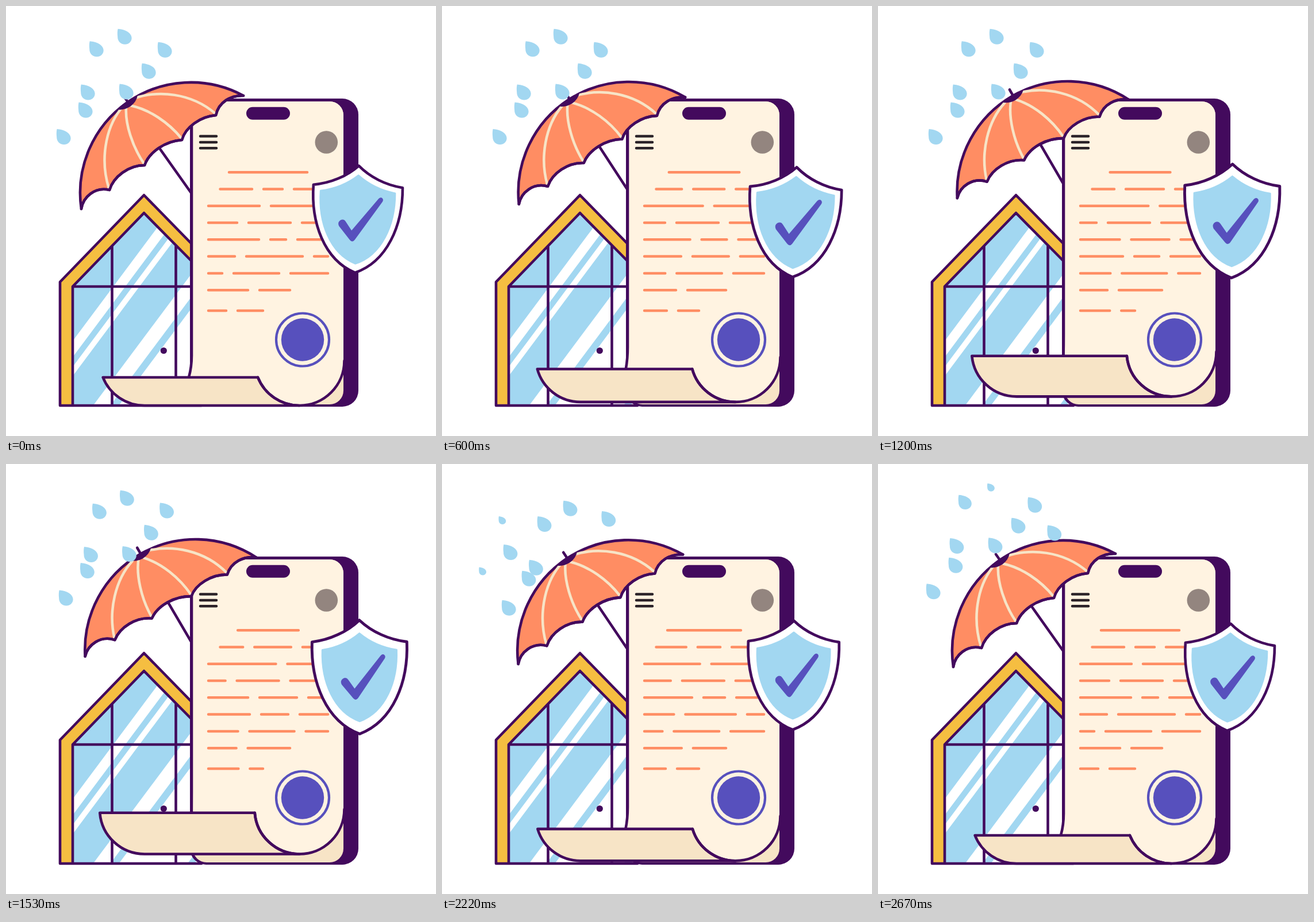
An HTML page that plays this animation: 748 px wide and 748 px high, repeating every 2700 ms.

```html
<!DOCTYPE html>
<html lang="en">
<head>
<meta charset="utf-8">
<title>Home insurance</title>
<style>
  html, body { margin: 0; width: 100%; height: 100%; overflow: hidden; background: #fff; }
  svg { display: block; width: 100vw; height: 100vh; }
  .line { fill: none; stroke: #430a5d; stroke-width: 4.6; stroke-linecap: round; stroke-linejoin: round; }
  .dark { fill: #430a5d; }
  .cream { fill: #fff3e1; }
  .beige { fill: #f7e4c6; }
  .blue { fill: #a2d7f1; }
  .violet { fill: #5750bd; }
</style>
</head>
<body>
<svg viewBox="0 0 748 748" xmlns="http://www.w3.org/2000/svg">
  <defs>
    <clipPath id="pane"><path d="M116 695V488L240 360L330 451V695Z"/></clipPath>
  </defs>

  <g id="house">
    <path fill="#f5be41" d="M94 695V480L240 329L330 421V695Z"/>
    <path class="blue" d="M116 695V488L240 360L330 451V695Z"/>
    <g id="shine" fill="#fff" clip-path="url(#pane)"></g>
    <path class="line" d="M94 695V480L240 329L330 421M116 695V488L240 360L330 451M94 695H340M116 488H330M184.500 418V695M295.500 417V695"/>
    <circle class="dark" cx="274.300" cy="599.500" r="5.600"/>
  </g>

  <path id="stick" class="line" d="M266 246L350 364.500"/>

  <g id="phone">
    <rect class="dark" x="320" y="161" width="293" height="536" rx="28"/>
    <rect class="beige" x="325" y="166" width="262" height="527" rx="24"/>
  </g>

  <path id="paper" class="cream"/>
  <rect class="dark" x="418" y="175.700" width="76" height="22" rx="11"/>
  <path d="M338 226.500H366M338 237H366M338 247.200H366" stroke="#2a2228" stroke-width="4.500" stroke-linecap="round"/>
  <circle cx="557.300" cy="237" r="19.800" fill="#93857f"/>
  <path id="text" fill="none" stroke="#ff8d63" stroke-width="4.500" stroke-linecap="round"/>
  <circle class="violet" cx="516" cy="580.500" r="37.200"/>
  <circle cx="516" cy="580.500" r="46" fill="none" stroke="#5750bd" stroke-width="4.200"/>
  <path id="edge" class="line"/>
  <path id="curl" class="line" style="fill:#f7e4c6"/>
  <path id="lobe" class="line"/>

  <g id="canopy">
    <path class="line" d="M212 167L205 157"/>
    <path class="line" style="fill:#ff8d63" d="M131 353A192.500 192.500 0 0 1 413 156C391 155 370 167 365 190C338 192 312 211 306 233C277 235 249 254 241 277C213 277 187 297 180 320C155 314 134 332 131 353Z"/>
    <path fill="none" stroke="#f7e4c6" stroke-width="4.500" stroke-linecap="round" d="M199 180C172 215 164 270 179 317M209 176C207 205 220 245 240 274M216 173C250 180 283 203 305 230M222 161C265 146 322 151 364 187"/>
    <path class="line" d="M131 353C134 332 155 314 180 320C187 297 213 277 241 277C249 254 277 235 306 233C312 211 338 192 365 190C370 167 391 155 413 156"/>
    <path class="dark" d="M193 180Q209 164 229 155Q227 167 216.500 174.500Q205 182 193 180Z"/>
  </g>

  <g id="rain" class="blue"></g>

  <g id="shield">
    <path id="rim" class="line" style="fill:#fff" d="M0 -93C-20 -74 -48 -61 -77.500 -57.500C-80 8 -55 72 0 93C55 72 80 8 77.500 -57.500C48 -61 20 -74 0 -93Z"/>
    <path id="plate" class="blue" stroke="#a2d7f1" stroke-width="3" stroke-linejoin="round" d="M0 -76.500C-18 -61.500 -40 -51.500 -65 -47.500C-67 8 -45 61 0 77.500C45 61 67 8 65 -47.500C40 -51.500 18 -61.500 0 -76.500Z"/>
    <path id="tick" class="violet" d="M-30.800 13Q-34 6 -28.500 2.500Q-23 -.5 -19.500 4.500L-8.600 20L36.500 -37Q40 -40.500 43 -38Q45.500 -35.500 43.500 -32L-2.500 36Q-6.500 41.500 -11 36.500Z"/>
  </g>
</svg>

<script>
const LOOP = 2700, SWING = 2670, SHOWER = 300;
const $ = id => document.getElementById(id);
const set = (id, name, value) => $(id).setAttribute(name, value);

function add(parent, d) {
  const path = document.createElementNS('http://www.w3.org/2000/svg', 'path');
  path.setAttribute('d', d);
  return $(parent).appendChild(path);
}

// Eased hill: 0 to 1 by `rise`, back to 0 between `fall` and `end`.
const ease = u => (1 - Math.cos(Math.PI * Math.max(0, Math.min(1, u)))) / 2;
const hill = (rise, fall, end = SWING) => t =>
  Math.min(ease(t / rise), ease((end - t) / (end - fall)));
const wave = (mid, amp, peak) => t => mid + amp * Math.cos(2 * Math.PI * (t - peak) / SWING);

const early = hill(1020, 1310, 2590);
const even = hill(1335, 1335);
const late = hill(1470, 1390);

const shield = {
  x: wave(613, 2.7, 1220),
  y: wave(371.8, 4.5, 750),
  turn: wave(1.1, 1.35, 350),
  rim: wave(1.034, .033, 1350),
  plate: wave(1.002, .029, 740),
  tick: wave(1.012, .034, 830)
};

// Text lines are full rules broken by gaps; each gap is [x, sway].
const GAP = 10;
const gaps = [
  [[438, -17], [491, 16]],
  [[451, 30]],
  [[412, -22], [505, -22]],
  [[450, -20], [497, 20]],
  [[408, 28], [526, -27]],
  [[386, 29], [485, 28]],
  [[431, -22]]
];

// Rain: x and y at time zero, travel per shower, birth.
const LIFE = 420, GROW = 60, FALL = 1.43;
const drops = [
  [206, 53, 42, -60],
  [276, 76, 34, -130],
  [157, 74.5, 52, -85],
  [89, 74, 53, 90],
  [106, 135, 32, 45],
  [60, 170, 40, 90]
];
const DROP = 'M0 0C9.500 .5 24 5.500 24 16C24 22.500 18.500 27 12.500 27C4.500 27 -.5 21.500 -.5 13.500C-1 8.500 -1 4.500 0 0Z';
const rain = drops.flatMap(drop => [-1, 0, 1].map(lap => ({ drop, lap, node: add('rain', DROP) })));

// Glass reflections: top and height of each band at the left frame.
for (const [top, height] of [[580, 28], [625, 16], [740, 40], [800, 160]]) {
  add('shine', `M118 ${top}l260 ${-260 * 1.34}v${height}L118 ${top + height}Z`);
}

function drawPaper(t) {
  const k = late(t), r = 78;
  const top = 646 - 40.5 * k, base = 695 - 17 * k, mid = base - r;
  const reach = Math.sqrt(r * r - (top - mid) ** 2);
  const left = 241 - reach, fold = 510.5 - reach, foot = 318 + 5 * k;
  const side = `V${top - 38}Q323 ${top - 18} ${foot} ${top}`;
  set('paper', 'd', `M323 200${side}H${fold}A${r} ${r} 0 0 0 510.500 ${base}A${r} ${r} 0 0 0 587 ${mid}V190A24 24 0 0 0 563 166H349A26 26 0 0 0 323 192Z`);
  set('edge', 'd', `M323 192${side}`);
  set('curl', 'd', `M${left} ${top}A${r} ${r} 0 0 0 241 ${base}H510.500A${r} ${r} 0 0 1 ${fold} ${top}Z`);
  set('lobe', 'd', `M${fold} ${top}A${r} ${r} 0 0 0 510.500 ${base}A${r} ${r} 0 0 0 588.500 ${mid}`);
}

function textLine(y, left, right, breaks, k) {
  let d = `M${left} ${y}`;
  for (const [x, sway] of breaks) {
    const mid = x + sway * k;
    d += `H${mid - GAP}M${mid + GAP} ${y}`;
  }
  return d + `H${right}`;
}

function drawText(t) {
  const inset = 16 * even(t);
  let d = textLine(289.3, 388 + inset, 524 - inset, [], 0);
  gaps.forEach((breaks, i) => {
    const left = i === 0 ? 372.5 : 352;
    const right = i === gaps.length - 1 ? 494 : 560;
    const k = (i % 2 ? even : early)(t);
    d += textLine(318.5 + 29.28 * i, left, right, breaks, k);
  });
  set('text', 'd', d + textLine(530, 352, 447, [[393, 22]], late(t)));
}

function drawRain(t) {
  for (const { drop: [x, y, travel, birth], lap, node } of rain) {
    const time = t % SHOWER + lap * SHOWER, age = time - birth;
    const size = age < 0 || age >= LIFE ? 0 : Math.min(1, age / GROW);
    const shift = travel * time / SHOWER;
    node.setAttribute('transform', `translate(${x - 11.5 + shift} ${y - 13.5 + shift * FALL}) scale(${size})`);
    node.setAttribute('visibility', size ? 'visible' : 'hidden');
  }
}

function draw(t) {
  const s = Math.min(t, SWING);
  const tilt = `rotate(${5.2 * even(s)} 347 421)`;
  set('canopy', 'transform', tilt);
  set('stick', 'transform', tilt);
  set('shield', 'transform', `translate(${shield.x(s)} ${shield.y(s)}) rotate(${shield.turn(s)})`);
  for (const part of ['rim', 'plate', 'tick']) set(part, 'transform', `scale(${shield[part](s)})`);
  drawPaper(s);
  drawText(s);
  drawRain(t);
}

const start = performance.now();
function frame() {
  draw((performance.now() - start) % LOOP);
  requestAnimationFrame(frame);
}
frame();
</script>
</body>
</html>
```
